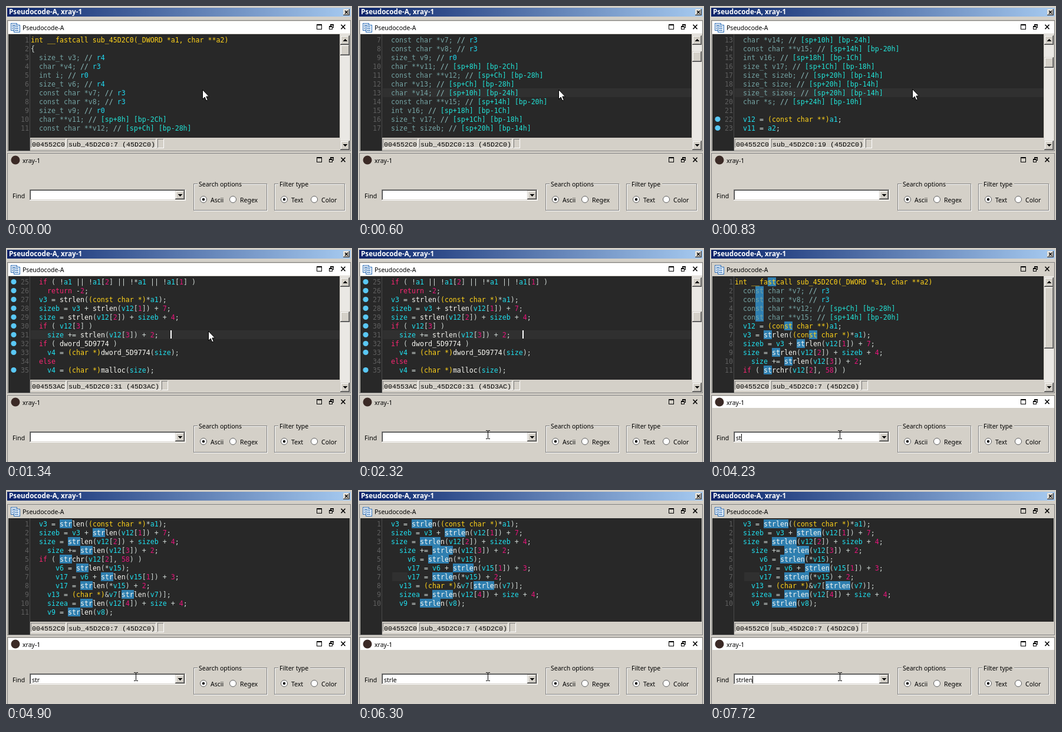
An HTML page for the animation above (8 s loop, 587 by 364 pixels).

```html
<!DOCTYPE html>
<html lang="en">
<head>
<meta charset="utf-8">
<title>Pseudocode filter</title>
<style>
  html, body { margin: 0; width: 100%; height: 100%; overflow: hidden; background: #d4d0c8; }
  svg { display: block; }
  rect, line, .crisp { shape-rendering: crispEdges; }
  text { white-space: pre; }
  .ui { font: 10.5px "Noto Sans", "Open Sans", sans-serif; }
  .title { font: bold 11.7px "Noto Sans", "Open Sans", sans-serif; fill: #fff; }
  .code { font: 11.627px "DejaVu Sans Mono", monospace; }
  .status { font: 11.667px "Liberation Mono", monospace; }
</style>
</head>
<body>
<svg id="stage" width="587" height="364" viewBox="0 0 587 364">
  <defs>
    <linearGradient id="bar">
      <stop offset="0" stop-color="#0a246a"/>
      <stop offset="1" stop-color="#a6caf0"/>
    </linearGradient>
    <g id="buttons" fill="none" stroke="#000" class="crisp">
      <path d="M527.5 1.5h8v7h-8zM527 .5h9"/>
      <path d="M550.5 3V.5h5v5H553M550 1.5h6M548.5 3.5h5v5h-5zM548 4.5h6"/>
      <path d="M568.5 .8l7 7.4M575.5 .8l-7 7.4" stroke-width="1.6" style="shape-rendering:auto"/>
    </g>
  </defs>
  <rect width="587" height="364" fill="#d4d0c8"/>
  <rect x="2" y="3" width="583" height="15" fill="url(#bar)"/>
  <text class="title" x="5" y="14">Pseudocode-A, xray-1</text>
  <g id="chrome"></g>
  <rect id="strip1" x="4" y="26" width="580" height="21"/>
  <rect id="strip2" x="4" y="252" width="580" height="20"/>

  <g class="crisp">
    <rect x="8" y="29" width="10" height="12" fill="#fff" stroke="#2c6cb4"/>
    <rect x="13" y="32" width="10" height="12" fill="#eaf4ff" stroke="#2c6cb4"/>
    <path d="M10 32.5h5M10 35.5h2M10 38.5h2M15 35.5h6M15 38.5h6M15 41.5h6" stroke="#1e5fa8"/>
  </g>
  <text class="ui" x="28" y="41">Pseudocode-A</text>
  <use href="#buttons" y="31"/>
  <circle cx="16" cy="262" r="7.5" fill="#3b2a26"/>
  <text class="ui" x="28" y="267">xray-1</text>
  <use href="#buttons" y="257"/>

  <rect x="4" y="48" width="579" height="176" fill="#282828"/>
  <rect x="4" y="224" width="37" height="22" fill="#282828"/>
  <rect x="40" y="48" width="1" height="198" fill="#4a4a4a"/>
  <g id="code" class="code"></g>
  <g id="status" class="status"></g>
  <g id="scroll"></g>
  <rect id="codeCaret" x="279" y="140" width="2" height="14" fill="#fff"/>

  <g id="panel"></g>
  <text id="query" class="ui" x="44" y="327"></text>
  <rect id="findCaret" y="316" width="1" height="13"/>

  <path id="arrow" d="M.5 .5V16.5L4.2 13 6.7 19 9.3 17.9 6.8 12H11.5Z" fill="#fff" stroke="#000"/>
  <path id="beam" class="crisp" d="M-3 -6.5H0M1 -6.5H4M.5 -6V7M-3 7.5H0M1 7.5H4" stroke="#000" fill="none"/>
</svg>
<script>
const LOOP = 8000, ROWS = 11, PITCH = 15, TOP = 50, LEFT = 42, CHAR = 7;
const $ = id => document.getElementById(id);

const lines = `int __fastcall sub_45D2C0(_DWORD *a1, char **a2)
{
  size_t v3; // r4
  char *v4; // r3
  int i; // r0
  size_t v6; // r4
  const char *v7; // r3
  const char *v8; // r3
  size_t v9; // r0
  char **v11; // [sp+8h] [bp-2Ch]
  const char **v12; // [sp+Ch] [bp-28h]
  char *v13; // [sp+Ch] [bp-28h]
  char *v14; // [sp+10h] [bp-24h]
  const char **v15; // [sp+14h] [bp-20h]
  int v16; // [sp+18h] [bp-1Ch]
  size_t v17; // [sp+1Ch] [bp-18h]
  size_t sizeb; // [sp+20h] [bp-14h]
  size_t size; // [sp+20h] [bp-14h]
  size_t sizea; // [sp+20h] [bp-14h]
  char *s; // [sp+24h] [bp-10h]

  v12 = (const char **)a1;
  v11 = a2;
  v14 = 0;
  if ( !a1 || !a1[2] || !*a1 || !a1[1] )
    return -2;
  v3 = strlen((const char *)*a1);
  sizeb = v3 + strlen(v12[1]) + 7;
  size = strlen(v12[2]) + sizeb + 4;
  if ( v12[3] )
    size += strlen(v12[3]) + 2;
  if ( dword_5D9774 )
    v4 = (char *)dword_5D9774(size);
  else
    v4 = (char *)malloc(size);
  if ( strchr(v12[2], 58) )
      v6 = strlen(*v15);
      v17 = v6 + strlen(v15[1]) + 3;
      v17 = strlen(*v15) + 2;
    v13 = (char *)&v7[strlen(v7)];
    sizea = strlen(v12[4]) + size + 4;
    v9 = strlen(v8);`.split("\n");

// [time, value] lists; the last entry already reached applies
const scrolls = [[0, 1], [460, 4], [580, 7], [700, 10], [830, 13], [880, 16], [960, 19], [1060, 22], [1340, 25]];
const typing = [[0, ""], [3800, "s"], [4230, "st"], [4360, "str"], [5300, "strl"], [5670, "strle"], [6600, "strlen"]];
const findBlink = [[0, 0], [2820, 1], [3340, 0], [3800, 1], [4900, 0], [5300, 1], [6300, 0], [6600, 1], [7230, 0], [7720, 1]];
const offsets = { 22: "2D4", 25: "2EC", 28: "35C", 31: "3AC" };
const at = (list, t) => list.filter(e => e[0] <= t).pop()[1];

const esc = s => s.replace(/&/g, "&amp;").replace(/</g, "&lt;");
const span = (color, s) => `<tspan fill="${color}">${esc(s)}</tspan>`;
const rect = (x, y, w, h, fill) => `<rect x="${x}" y="${y}" width="${w}" height="${h}" fill="${fill}"/>`;
const label = (x, y, s, cls = "ui") => `<text class="${cls}" x="${x}" y="${y}">${esc(s)}</text>`;

// Box with one colour on the top and left edges, another on the bottom and right
function bevel(x, y, w, h, fill, light, dark) {
  return rect(x, y, w, h, dark) + rect(x, y, w - 1, h - 1, light) + rect(x + 1, y + 1, w - 2, h - 2, fill);
}
const face = "#d4d0c8";
const raised = (x, y, w, h) => bevel(x, y, w, h, face, face, "#404040") +
  bevel(x + 1, y + 1, w - 2, h - 2, face, "#fff", "#808080");
const sunken = (x, y, w, h) => bevel(x, y, w, h, face, "#808080", "#fff");
const tri = (x, y, d) => `<path class="crisp" d="M${x - 4} ${y}h8l-4 ${4 * d}z"/>`;

const palette = ["#ffd21a", "#f92672", "#20dfee", "#e6147a", "#f8f8f2", "#cfd8d4"];
const tokens = /(\((?:const )?char \*+\))|(\b(?:if|return|else)\b)|(\b(?:v\d+|a[12]|size[ab]?)\b)|(\b\d+\b)|([a-z_]\w+)|(\s+|.)/g;

function paint(s) {
  if (s.startsWith("int __")) return span(palette[0], s);
  const cut = s.indexOf("//");
  if (cut >= 0) {
    return span("#74a3a3", s.slice(0, cut)) + span("#8fc0c0", "// ") +
      span(s.includes("[") ? "#22e2d6" : "#20d8f0", s.slice(cut + 3));
  }
  return [...s.matchAll(tokens)]
    .map(m => span(palette[m.slice(1).findIndex(g => g !== undefined)], m[0])).join("");
}

function marks(s, q, y) {
  let out = "";
  for (let i = s.indexOf(q); q && i >= 0; i = s.indexOf(q, i + q.length))
    out += rect(LEFT + CHAR * i, y, CHAR * q.length, PITCH, "#2f7fb0");
  return out;
}

function drawCode(top, q, t) {
  const found = q ? lines.filter(s => s.includes(q)) : lines;
  const first = q ? 1 : top;
  const hl = TOP + 6 * PITCH;
  let out = "";
  if (t >= 400 && t < 2820) out += rect(LEFT, hl, 524, PITCH, "#303030");
  if (t >= 5300) out += rect(58, hl, 26, PITCH, "#303030");
  found.slice(first - 1, first - 1 + ROWS).forEach((s, i) => {
    const n = first + i, y = TOP + PITCH * i;
    if (!q && n > 21 && n !== 34) out += `<circle cx="13" cy="${y + 7.5}" r="4.6" fill="#5ac8f5"/>`;
    out += `<text x="39" y="${y + 12}" text-anchor="end" fill="#5e5e5e">${n}</text>`;
    out += marks(s, q, y) + `<text x="${LEFT}" y="${y + 12}">${paint(s)}</text>`;
  });
  $("code").innerHTML = out;

  const cur = first + 6, off = offsets[cur] || "2C0";
  const place = `sub_45D2C0:${cur} (45D${off})`, w = CHAR * place.length + 4;
  $("status").innerHTML = sunken(42, 226, 60, 16) + label(44, 239, "00455" + off, "status") +
    sunken(104, 226, w, 16) + label(106, 239, place, "status") + sunken(106 + w, 226, 11, 16);
  $("scroll").innerHTML = found.length > ROWS ? scrollbar(first, q ? 162 * ROWS / found.length : 18) : "";
}

function scrollbar(first, size) {
  return rect(566, 48, 1, 176, face) + rect(567, 48, 16, 197, "#eae8e4") +
    raised(567, 50, 16, 16) + tri(575, 60, -1) + raised(567, 229, 16, 16) + tri(575, 235, 1) +
    raised(567, Math.round(66.4 + 1.75 * (first - 1)), 16, Math.round(size));
}

function radio(x, s, on) {
  return `<circle cx="${x}" cy="329" r="5.5" fill="#fff" stroke="#606060"/>` +
    (on ? `<circle cx="${x}" cy="329" r="2.2"/>` : "") + label(x + 12, 334, s);
}

function group(x, w, s, gap) {
  const box = (d, c) => `<rect x="${x + d + .5}" y="${302.5 + d}" width="${w}" height="45" fill="none" stroke="${c}"/>`;
  return box(1, "#fff") + box(0, "#808080") + rect(x + 7, 302, gap, 3, face) + label(x + 9, 307, s);
}

function drawStatic() {
  const frame = (y, h) => `<rect x="2.5" y="${y}" width="582" height="${h}" fill="none" stroke="#808080"/>`;
  $("chrome").innerHTML = frame(24.5, 222) + frame(250.5, 130) + raised(572, 5, 11, 11) +
    '<path d="M575 8l5 5M580 8l-5 5" stroke="#000" stroke-width="1.3"/>';
  $("panel").innerHTML = label(11, 327, "Find") + sunken(40, 312, 265, 19) +
    bevel(41, 313, 263, 17, "#fff", "#404040", face) + raised(287, 314, 16, 15) + tri(295, 320, 1) +
    group(318, 124, "Search options", 75) + radio(335, "Ascii", true) + radio(385, "Regex") +
    group(455, 119, "Filter type", 54) + radio(472, "Text", true) + radio(523, "Color");
}

function pointer(t) {
  if (t < 85) return [333, 142];
  if (t < 400) return [335, 143];
  if (t < 1850) {
    const p = Math.min(1, Math.floor((t - 340) / 60) / 6);
    return [335 + 8 * p, 143 - 2 * p];
  }
  const p = Math.min(1, (Math.floor((t - 1850) / 58) + 1) / 9);
  const e = p * p * (3 - 2 * p);
  return [343 - 123 * e, 141 + 176 * e];
}

const show = (id, on) => $(id).setAttribute("visibility", on ? "visible" : "hidden");
let lastKey;

function render(t) {
  const top = at(scrolls, t), q = at(typing, t), find = t >= 2820;
  const key = [top, q, t >= 400, find].join();
  if (key !== lastKey) {
    lastKey = key;
    drawCode(top, q, t);
    $("query").textContent = q;
    const w = q ? $("query").getComputedTextLength() : 0;
    $("findCaret").setAttribute("x", Math.max(45, Math.floor(44.6 + w)));
    $("strip1").setAttribute("fill", find ? face : "#fff");
    $("strip2").setAttribute("fill", find ? "#fff" : face);
  }
  show("codeCaret", !find && t >= 70 && (t + 960) % 1000 < 500);
  show("findCaret", at(findBlink, t));

  const [x, y] = pointer(t).map(Math.round), inEdit = y > 313;
  show("arrow", !inEdit);
  show("beam", inEdit);
  $(inEdit ? "beam" : "arrow").setAttribute("transform", `translate(${x} ${y})`);
}

function tick() {
  render(performance.now() % LOOP);
  requestAnimationFrame(tick);
}
drawStatic();
tick();
</script>
</body>
</html>
```
